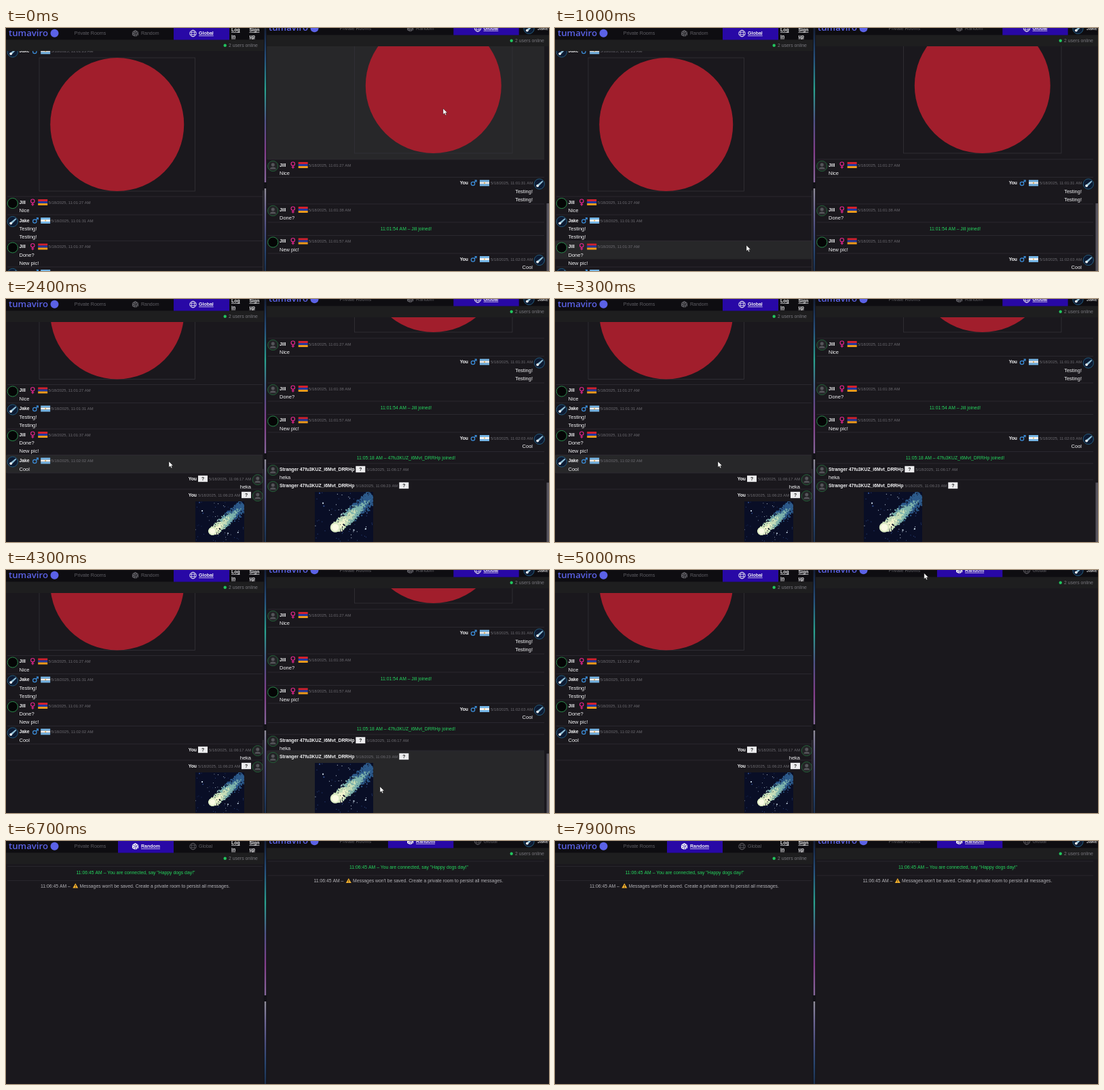
Recreate the animation shown at these times as an HTML page with a canvas. Size 800x359 px, loop 8 s.

```html
<!DOCTYPE html>
<html lang="en">
<head>
<meta charset="utf-8">
<title>Chat rooms</title>
<style>
html, body { margin: 0; width: 100%; height: 100%; overflow: hidden; background: #1a181d; }
canvas { display: block; width: 800px; height: 359px; }
</style>
</head>
<body>
<canvas id="stage"></canvas>
<script>
const W = 800, H = 359, LOOP = 8000, STEP = 100;
const SANS = '"Liberation Sans", Arial, sans-serif';
const BG = '#1a181d', GREEN = '#25d45e', GREY = '#77767c', WHITE = '#f4f4f6', RED = '#a11e2c';
const canvas = document.getElementById('stage');
const dpr = window.devicePixelRatio || 1;
canvas.width = W * dpr;
canvas.height = H * dpr;
let g = canvas.getContext('2d');
g.scale(dpr, dpr);

function rect(x, y, w, h, color) {
  g.fillStyle = color;
  g.fillRect(x, y, w, h);
}
function disc(x, y, r, color) {
  g.fillStyle = color;
  g.beginPath();
  g.arc(x, y, r, 0, 7);
  g.fill();
}
function poly(points, color) {
  g.fillStyle = color;
  g.beginPath();
  for (const [x, y] of points) g.lineTo(x, y);
  g.closePath();
  g.fill();
}
function ring(x, y, rx, ry, color, width) {
  g.strokeStyle = color;
  g.lineWidth = width;
  g.beginPath();
  g.ellipse(x, y, rx, ry, 0, 0, 7);
  g.stroke();
}
function line(x1, y1, x2, y2, color, width) {
  g.strokeStyle = color;
  g.lineWidth = width;
  g.beginPath();
  g.moveTo(x1, y1);
  g.lineTo(x2, y2);
  g.stroke();
}
// y is the optical middle of the line
function text(str, x, y, color, size, opt = {}) {
  g.font = `${opt.weight || 400} ${size}px ${opt.font || SANS}`;
  g.textAlign = opt.align || 'left';
  g.fillStyle = color;
  g.fillText(str, x, y + size * 0.35);
  const w = g.measureText(str).width;
  if (opt.under) rect(x, y + size * 0.35 + 0.9, w, 0.7, color);
  return w;
}
function random(seed) {
  return () => (seed = (seed * 16807) % 2147483647) / 2147483647;
}
function clipTo(x, y, w, h, draw) {
  g.save();
  g.beginPath();
  g.rect(x, y, w, h);
  g.clip();
  draw();
  g.restore();
}

// Pixel-art comet, painted once
function paintComet(size) {
  const c = document.createElement('canvas');
  c.width = c.height = size;
  const main = g, rnd = random(77), px = size / 86;
  g = c.getContext('2d');
  rect(0, 0, size, size, '#090e26');
  for (let i = 0; i < 80; i++) {
    const s = rnd() < 0.15 ? 2 : 1;
    rect(rnd() * size, rnd() * size, s * px, s * px, rnd() < 0.4 ? '#c9d9e8' : '#2f4a86');
  }
  for (let i = 0; i < 1000; i++) {
    const u = Math.pow(rnd(), 0.9), v = (rnd() + rnd() - 1) * (0.1 + 0.05 * u);
    const x = 0.34 + 0.64 * u + v * 0.65, y = 0.62 - 0.55 * u + v * 0.8;
    const heat = u * 0.85 + Math.abs(v) * 3 + rnd() * 0.25;
    const color = heat < 0.4 ? '#f4f6cf' : heat < 0.6 ? '#c7dfb9' : heat < 0.85 ? '#7db3ad' : '#2d5b8c';
    rect(x * size, y * size, 2 * px, 2 * px, color);
  }
  disc(0.35 * size, 0.61 * size, 0.085 * size, '#dcebc4');
  disc(0.35 * size, 0.61 * size, 0.06 * size, '#fbfbe4');
  g = main;
  return c;
}
const comet = paintComet(172);

function avatar(x, y, kind) {
  disc(x, y, 7.6, kind === 'dot' ? '#050506' : kind === 'comet' ? '#0d1b33' : '#232326');
  if (kind === 'comet') {
    poly([[x - 4.2, y + 2], [x + 4.5, y - 5], [x + 5.5, y - 3.6], [x - 2, y + 4.2]], '#8fbfd6');
    disc(x - 2.7, y + 2.6, 1.9, '#f0f4f4');
  } else if (kind === 'person') {
    disc(x, y - 2, 2.5, '#55555a');
    g.beginPath();
    g.ellipse(x, y + 4.6, 4.4, 3.2, 0, Math.PI, 0);
    g.fill();
  }
  ring(x, y, 7.6, 7.6, kind === 'comet' ? '#245b7c' : kind === 'dot' ? '#2a8a4c' : '#236139', 1);
}
function gender(x, y, kind) {
  if (kind === 'f') {
    ring(x, y - 1.8, 2.7, 2.7, '#e0258c', 1.2);
    line(x, y + 1, x, y + 5.2, '#e0258c', 1.2);
    line(x - 2, y + 3.2, x + 2, y + 3.2, '#e0258c', 1.2);
  } else {
    ring(x - 1, y + 1, 2.7, 2.7, '#3c8fdc', 1.2);
    line(x + 1, y - 1, x + 4, y - 4, '#3c8fdc', 1.2);
    line(x + 1.4, y - 4, x + 4.4, y - 4, '#3c8fdc', 1.2);
    line(x + 4, y - 4.2, x + 4, y - 1.2, '#3c8fdc', 1.2);
  }
}
function flag(x, y, kind) {
  const bands = kind === 'f' ? ['#d2202e', '#2338a0', '#ee9a1c'] : ['#74b4e4', '#f4f4f4', '#74b4e4'];
  bands.forEach((c, i) => rect(x, y - 4.5 + i * 3, 14, 3, c));
  if (kind === 'm') disc(x + 7, y, 1, '#e5b04a');
}
function badge(x, y) {
  rect(x, y - 4.7, 14, 9.4, '#ececee');
  text('?', x + 7, y, '#222', 6.8, { align: 'center', weight: 700 });
}

const STRANGER = 'Stranger 47fu3KUZ_i6Mvt_DRRHp';
const people = {
  jill: { name: 'Jill', sex: 'f' },
  jake: { name: 'Jake', sex: 'm' },
  me: { name: 'You', sex: 'm', own: true },
  guest: { name: 'You', own: true },
  stranger: { name: STRANGER }
};
const row = (top, who, face, time, lines, extra) => ({ top, who, face, time, lines, ...extra });
const note = (top, str) => ({ top, note: str, lines: [] });

const left = {
  x: 0, w: 380, edge: 361, bar: 17.5, lineEnd: 378, midX: 190,
  tabX: 83, tabW: 82, dy: 0, logoX: 4, online: 328,
  picX: 279, picW: 72, box: [49, 44, 229.5, 197],
  shifts: [[0, 0], [1300, -24.5], [2000, -122.5]], randomAt: 5300,
  rows: [
    row(25.5, 'jake', 'comet', '11:01:23', [], { logo: true }),
    row(249, 'jill', 'dot', '11:01:27', ['Nice']),
    row(276, 'jake', 'comet', '11:01:31', ['Testing!', 'Testing!']),
    row(314.5, 'jill', 'dot', '11:01:37', ['Done?', 'New pic!']),
    row(353, 'jake', 'comet', '11:02:02', ['Cool']),
    row(379.5, 'guest', 'person', '11:06:17', ['heka']),
    row(403.5, 'guest', 'person', '11:06:23', [], { pic: true })
  ]
};
const right = {
  x: 383.5, w: 416.5, edge: 776, bar: 10.5, lineEnd: 793, midX: 591,
  tabX: 466.5, tabW: 96.4, dy: -7.5, logoX: 387, online: 750,
  picX: 455, picW: 86, box: [513.5, -15, 232.5, 200],
  shifts: [[0, 0], [1300, -24.5], [2000, -136]], randomAt: 4900,
  rows: [
    row(-35, 'jake', 'comet', '11:01:23', [], { logo: true }),
    row(194, 'jill', 'person', '11:01:27', ['Nice']),
    row(220.5, 'me', 'comet', '11:01:31', ['Testing!', 'Testing!']),
    row(260, 'jill', 'person', '11:01:38', ['Done?']),
    note(287, '11:01:54 AM – Jill joined!'),
    row(306.5, 'jill', 'dot', '11:01:57', ['New pic!']),
    row(333, 'me', 'comet', '11:02:03', ['Cool']),
    note(361.5, '11:05:18 AM – ' + STRANGER.slice(9) + ' joined!'),
    row(379, 'stranger', 'person', '11:06:17', ['heka']),
    row(403, 'stranger', 'person', '11:06:23', [], { pic: true })
  ]
};

function stamp(str, x, y, align) {
  text(`5/18/2025, ${str} AM`, x, y, '#6e6d73', 5.85, { align });
}
function drawRow(p, r, dy) {
  const top = r.top + dy, y = top + 8.5;
  line(p.x + 2, top, p.lineEnd, top, '#2f2d34', 0.8);
  if (r.note) {
    text(r.note, p.midX - 1.5, top + 9.5, GREEN, 6.8, { align: 'center' });
    return;
  }
  const who = people[r.who], swap = r.pic, e = p.edge;
  if (who.own) {
    avatar(e + 9.8, y + 1.5, r.face);
    text(who.name, e - (who.sex ? 95 : 80), y, WHITE, 6.8, { weight: 700, align: 'right' });
    if (who.sex) {
      gender(e - 87, y, who.sex);
      flag(e - 78, y, who.sex);
    } else badge(swap ? e - 14 : e - 78, y);
    stamp(r.time, swap ? e - 16 : e, y, 'right');
    r.lines.forEach((s, i) => text(s, e, y + 12 * (i + 1), WHITE, 7.5, { align: 'right' }));
  } else {
    const nx = p.x + 19.5;
    avatar(p.x + 9.8, y + 1.5, r.face);
    const end = nx + text(who.name, nx, y, WHITE, 6.8, { weight: 700 });
    if (who.sex) {
      const at = p.x + (who.sex === 'f' ? 31 : 35);
      gender(at + 8.3, y, who.sex);
      flag(at + 16.2, y, who.sex);
      stamp(r.time, at + 31.6, y);
    } else {
      badge(swap ? end + 66 : end + 2, y);
      stamp(r.time, swap ? end + 2 : end + 18, y);
    }
    r.lines.forEach((s, i) => text(s, nx, y + 12 * (i + 1), WHITE, 7.5));
  }
  if (r.pic) g.drawImage(comet, p.picX, y + 9.5, p.picW, p.picW);
  if (r.logo) {
    const [bx, by, bw, bh] = p.box;
    g.strokeStyle = '#343239';
    g.lineWidth = 0.8;
    g.strokeRect(bx, by + dy, bw, bh);
    disc(bx + bw / 2, by + dy + bh / 2, bh / 2, RED);
  }
}

function stepValue(steps, t) {
  let v = 0;
  for (const [at, value] of steps) if (t >= at) v = value;
  return v;
}
function drawGlobal(p, t, mouse) {
  const dy = stepValue(p.shifts, t), top = p.bar + 16.5;
  clipTo(p.x, top, p.w, H - top, () => {
    p.rows.forEach((r, i) => {
      const next = p.rows[i + 1];
      // a second line is a message of its own, so only the first lights up
      const end = r.lines.length > 1 ? r.top + 27 : next ? next.top : 600;
      const over = mouse && mouse.x >= p.x && mouse.x < p.x + p.w &&
        mouse.y >= r.top + dy && mouse.y < end + dy && mouse.y > top;
      if (over) rect(p.x, r.top + dy, p.lineEnd - p.x, end - r.top, '#272729');
      drawRow(p, r, dy);
    });
  });
  if (p === right) rect(796.5, 259 - dy * 0.09, 3.5, 120, '#57545e');
  else rect(378.3, 240 - dy * 0.09, 1.2, 130, '#3d3b43');
}
function drawRandom(p, t) {
  if (t < 6000) return;
  const top = p.bar + 17 + (p === left ? 3 : 2.5), mid = p.midX + (p === right ? 2.5 : 1);
  line(p.x + 2, top, p.lineEnd, top, '#2b2930', 0.8);
  line(p.x + 2, top + 21, p.lineEnd, top + 21, '#2b2930', 0.8);
  text('11:06:45 AM – You are connected, say "Happy dogs day!"', mid, top + 8.8, GREEN, 6.83, { align: 'center' });
  const y = top + 28.7, x = mid - 140;
  text('11:06:45 AM –', x, y, '#b3b2b7', 6.83);
  poly([[x + 51.3, y - 3.6], [x + 55.3, y + 3.4], [x + 47.3, y + 3.4]], '#f2b02e');
  rect(x + 50.9, y - 1.2, 0.8, 2.4, '#3a2a08');
  rect(x + 50.9, y + 1.8, 0.8, 0.8, '#3a2a08');
  text("Messages won't be saved. Create a private room to persist all messages.", x + 57.5, y, '#b3b2b7', 6.83);
}

function globe(x, y, color) {
  ring(x, y, 4.7, 4.7, color, 0.9);
  ring(x, y, 2.1, 4.7, color, 0.7);
  line(x - 4.5, y - 1.7, x + 4.5, y - 1.7, color, 0.7);
  line(x - 4.5, y + 1.7, x + 4.5, y + 1.7, color, 0.7);
}
function cube(x, y, color, back) {
  poly([[x, y - 5], [x + 4.6, y - 2.6], [x + 4.6, y + 2.6], [x, y + 5], [x - 4.6, y + 2.6], [x - 4.6, y - 2.6]], color);
  line(x, y, x, y + 5, back, 0.7);
  line(x, y, x - 4.6, y - 2.5, back, 0.7);
  line(x, y, x + 4.6, y - 2.5, back, 0.7);
  for (const [dx, dy] of [[0, -2.5], [-2.4, 1.4], [2.2, 0.2], [2.6, 2.2]]) disc(x + dx, y + dy, 0.7, back);
}
function drawHeader(p, isRandom) {
  const y = 8 + p.dy;
  rect(p.x, 0, p.w, p.bar, '#0e0d11');
  rect(p.x, p.bar, p.w, 16.5, '#1e1e1f');
  const active = p.tabX + p.tabW * (isRandom ? 1 : 2), blue = '#2808a6';
  rect(active, 0, p.tabW, p.bar, blue);
  text('tumaviro', p.logoX, y - 0.7, '#5b62e6', 13.2, { weight: 600, font: '"Open Sans", sans-serif' });
  disc(p.logoX + 67.5, y - 0.3, 6, '#5b62e6');
  const mid = i => p.tabX + p.tabW * (i + 0.5);
  text('Private Rooms', mid(0), y, '#5f5e64', 7.1, { align: 'center' });
  const label = (str, x, on) => text(str, x, y, on ? WHITE : '#5f5e64', 7, { weight: on ? 700 : 400, under: on });
  const tint = on => on ? WHITE : '#5f5e64';
  cube(mid(1) - 15.5, y, tint(isRandom), isRandom ? blue : '#0e0d11');
  label('Random', mid(1) - 7, isRandom);
  globe(mid(2) - 12.5, y, tint(!isRandom));
  label('Global', mid(2) - 4, !isRandom);
  const oy = p.bar + 8;
  disc(p.online - 5.3, oy + 0.3, 2.2, '#22c55e');
  text('2 users online', p.online, oy, GREY, 6.9);
  if (p === left) {
    const bold = { weight: 700, under: true };
    text('Log', 332, 3, WHITE, 6.9, bold);
    text('in', 332, 12.3, WHITE, 6.9, bold);
    text('Sign', 358.5, 3, WHITE, 6.9, bold);
    text('up', 358.5, 12.3, WHITE, 6.9, bold);
  } else {
    avatar(770.5, 1, 'comet');
    text('Jake', 783, 0.8, WHITE, 7.5);
  }
}

function glow(y, h, stops) {
  const grad = g.createLinearGradient(0, y, 0, y + h);
  stops.forEach((c, i) => grad.addColorStop(i / (stops.length - 1), c));
  rect(380.8, y, 2.4, h, grad);
}
function drawDivider() {
  rect(379.8, 0, 4.4, H, '#121117');
  glow(0, 228, ['#15203a', '#28527f', '#2aa38e', '#505488', '#853f8c', '#86699a']);
  glow(237, 122, ['#918e99', '#6f6896', '#4d5080', '#294670', '#1c314e']);
}

const files = [
  ['Saved Pictures', '5/1/2025', 0], ['Screenshots', '5/28/2025', 0], ['org', '5/27/2025', 0],
  ['terrain themes', '5/21/2025', 0], ['studio', '12/5/2024', 0],
  ['session-support ca...', '5/17/2025', 78], ['android.png', '5/12/2025', 46],
  ['background-color...', '5/9/2025', 1], ['comet.jpg', '5/24/2025', 10],
  ['domain.png', '5/9/2025', 1], ['docker.png', '5/24/2025', 6]
];
const places = ['Desktop', 'Downloads', 'Music', 'Videos', 'vsCodeMaps', 'pictures', 'Documents', 'Screenshots'];
function drawDialog(alpha) {
  if (!alpha) return;
  g.save();
  g.globalAlpha = alpha;
  rect(15, 0, 440, 209, '#1b1b1c');
  rect(15, 172, 440, 37, '#242425');
  line(94, 17, 94, 172, '#3a3a3c', 0.8);
  const put = (s, x, y, color = '#d0d0d2', align = 'left') => text(s, x, y, color, 5.6, { align });
  put('New folder', 66, 9);
  rect(398, 6, 7, 6, '#8a8a8e');
  rect(423, 5, 8, 8, '#3d6ea8');
  ring(443, 9, 3.2, 3.2, '#a0a0a4', 0.8);
  rect(29, 20, 8, 7, '#3f87b8');
  put('Gallery', 41, 24);
  places.forEach((s, i) => {
    const y = 54 + i * 14.8;
    rect(30, y - 3, 7, 6, ['#3c8fc4', '#38a06a', '#c05a4a', '#7d55c0', '#d3a73f'][Math.min(i, 4)]);
    put(s, 41, y);
    disc(76, y, 1.1, '#9a9a9e');
  });
  [['Name', 103], ['Date', 167], ['Type', 241], ['Size', 297], ['Tags', 333]].forEach(([s, x]) => put(s, x, 23, '#a8a8ac'));
  files.forEach(([name, date, kb], i) => {
    const y = 36 + i * 13;
    if (i === 8) {
      rect(96, y - 5.5, 275, 11, '#55555a');
      g.strokeStyle = '#909094';
      g.lineWidth = 0.7;
      g.strokeRect(96, y - 5.5, 275, 11);
    }
    rect(98, y - 3, kb ? 5.5 : 7, 6, kb ? '#c9c9cd' : '#dcae45');
    put(name, 107, y);
    put(date, 167, y, '#b0b0b4');
    put(kb ? (i === 8 ? 'JPG File' : 'PNG File') : 'File folder', 241, y, '#b0b0b4');
    if (kb) put(kb + ' KB', 327, y, '#b0b0b4', 'right');
  });
  rect(449, 45, 1.5, 38, '#69696d');
  put('File name:', 75, 182);
  g.strokeStyle = '#77777b';
  g.lineWidth = 0.7;
  g.strokeRect(103, 177, 250, 10);
  g.strokeRect(358, 177, 89, 10);
  g.strokeRect(358, 191, 41, 10.5);
  g.strokeRect(405, 191, 41, 10.5);
  put('comet.jpg', 106, 182);
  put('Image files (*.jpg;*.png)', 361, 182);
  put('Open', 378.5, 196.2, '#e8e8ea', 'center');
  put('Cancel', 425.5, 196.2, '#e8e8ea', 'center');
  g.restore();
}
function drawSkip(alpha) {
  if (!alpha) return;
  g.save();
  g.globalAlpha = alpha;
  disc(652, 187, 20.5, '#060608');
  for (const x of [642.5, 650, 657.5]) poly([[x, 182], [x + 5, 185], [x, 188]], '#f0f0f2');
  text('5 segundos', 652, 196, '#f0f0f2', 4.5, { align: 'center', weight: 700 });
  g.restore();
}

// time, x, y
const path = [
  [0, 644, 119], [300, 644, 119], [800, 300, 300], [1000, 282, 321], [1200, 282, 321],
  [1600, 153, 146], [1800, 153, 146], [2300, 240, 240], [3300, 240, 240], [4000, 551, 320],
  [4400, 551, 320], [4800, 606, 4], [4900, 606, 4], [5300, 208, 8], [5400, 208, 8]
];
function pointer(t) {
  for (let i = 1; i < path.length; i++) {
    const [t0, x0, y0] = path[i - 1], [t1, x1, y1] = path[i];
    if (t > t1) continue;
    const u = (t - t0) / (t1 - t0), k = u * u * (3 - 2 * u);
    return { x: x0 + (x1 - x0) * k, y: y0 + (y1 - y0) * k };
  }
  return null;
}
function drawPointer({ x, y }) {
  const shape = [[0, 0], [0, 8.6], [2, 6.8], [3.4, 9.8], [4.8, 9.2], [3.5, 6.3], [6.2, 6.2]];
  poly(shape.map(([a, b]) => [x + a, y + b]), '#fff');
  g.strokeStyle = '#111';
  g.lineWidth = 0.4;
  g.stroke();
}

function draw(t) {
  rect(0, 0, W, H, BG);
  const mouse = pointer(t);
  const dialog = stepValue([[1300, 0.5], [1400, 1], [1700, 0.5], [1800, 0]], t);
  for (const p of [left, right]) {
    const isRandom = t >= p.randomAt;
    clipTo(p.x, 0, p.w, H, () => {
      if (isRandom) drawRandom(p, t);
      else drawGlobal(p, t, dialog ? null : mouse);
      drawHeader(p, isRandom);
    });
  }
  drawDivider();
  drawDialog(dialog);
  drawSkip(stepValue([[1600, 0.5], [1700, 0.9], [1900, 0.5], [2000, 0]], t));
  if (mouse) drawPointer(mouse);
}

const start = performance.now();
function tick() {
  const t = (performance.now() - start) % LOOP;
  draw(Math.floor(t / STEP) * STEP);
  requestAnimationFrame(tick);
}
tick();
</script>
</body>
</html>
```
